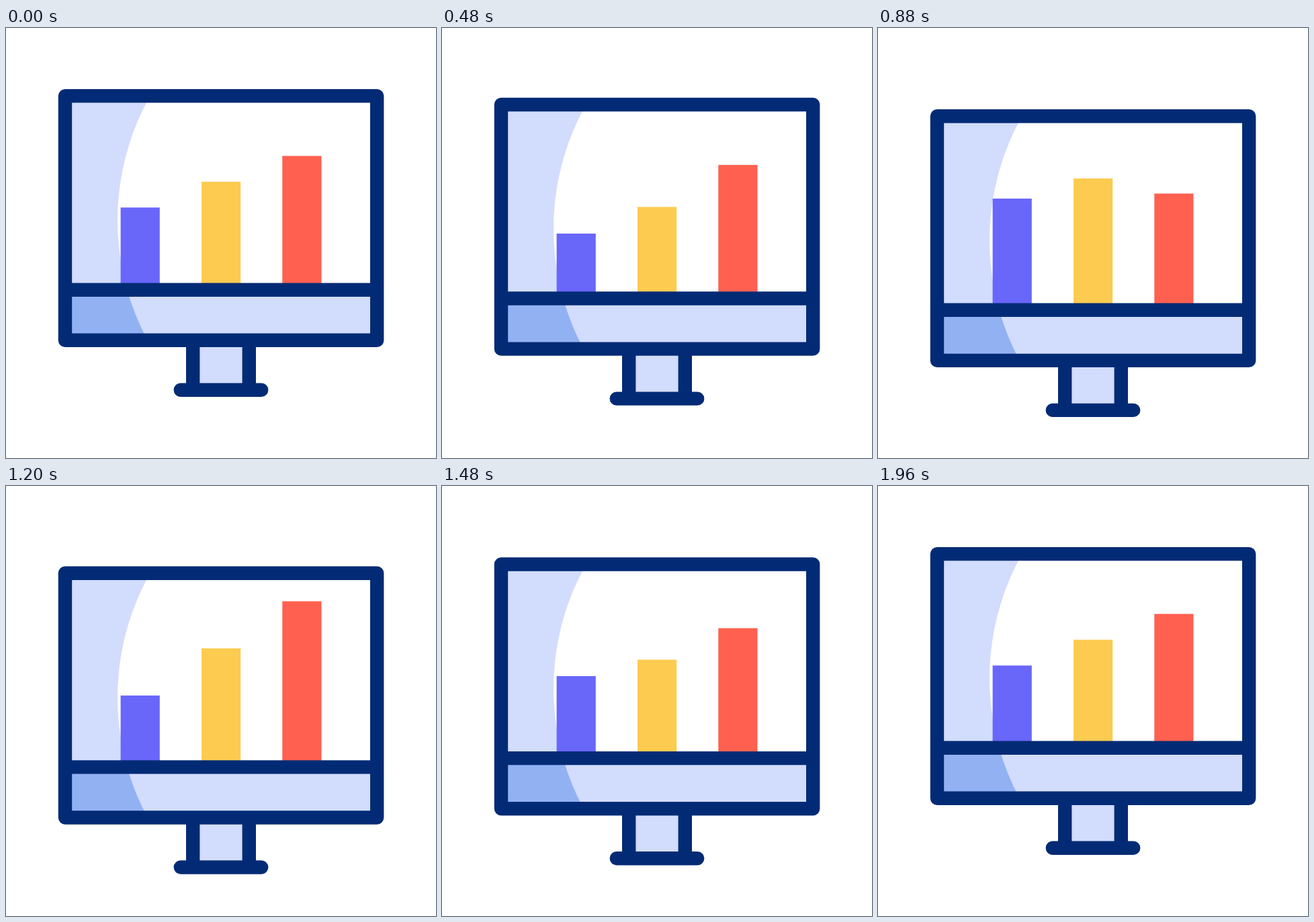
An HTML page for the animation above (2000 ms loop, 640x640 px).

```html
<!DOCTYPE html>
<html lang="en">
<head>
<meta charset="utf-8">
<title>Bar chart on a monitor</title>
<style>
  html, body { margin: 0; height: 100%; overflow: hidden; background: #fff; }
  svg { display: block; width: 100%; height: 100%; }
  .line { fill: none; stroke: #032b75; stroke-width: 20.4; stroke-linecap: round; stroke-linejoin: round; }
</style>
</head>
<body>
<svg viewBox="0 0 640 640">
  <clipPath id="case"><path d="M88 101H552V465H88Z"/></clipPath>
  <g id="monitor">
    <g clip-path="url(#case)">
      <path fill="#d2dcfd" d="M88 101H552V390H88Z"/>
      <circle cx="543.6" cy="286" r="377.6" fill="#fff"/>
    </g>
    <g id="bars">
      <rect x="170.6" width="58.2" fill="#6966fa"/>
      <rect x="291" width="58.2" fill="#fdcb50"/>
      <rect x="411.3" width="58.2" fill="#ff6050"/>
    </g>
    <path fill="#92b1f3" d="M88 390H552V465H88Z"/>
    <path fill="#d2dcfd" d="M180.3 390A377.6 377.6 0 0 0 210.8 465H552V390Z"/>
    <path fill="#d2dcfd" d="M278.2 465H361.8V539H278.2Z"/>
    <path class="line" d="M88 101.1H552.2V464.8H88ZM88 389.7H552.2M278.2 464.8H361.8V538.8H278.2ZM259.8 538.8H380.2"/>
  </g>
</svg>
<script>
const LOOP = 2000, STEP = 40, BASE = 390, DELAY = 200;
const restHeights = [122.8, 161.2, 199.6];
// Keys are [time in ms, value in px].
const drift = [[40, 0], [1000, 30.8], [1960, 0]];
const wave = [[40, 0], [400, -31], [800, 47.5], [1200, -16], [1520, 0]];

const monitor = document.getElementById('monitor');
const bars = [...document.getElementById('bars').children];

// Same curve as cubic-bezier(.5, 0, .5, 1), solved by bisection.
function ease(x) {
  let lo = 0, hi = 1;
  for (let i = 0; i < 24; i++) {
    const u = (lo + hi) / 2;
    if (1.5 * u * (1 - u) + u ** 3 < x) lo = u; else hi = u;
  }
  return lo * lo * (3 - 2 * lo);
}

function valueAt(keys, t) {
  if (t <= keys[0][0]) return keys[0][1];
  for (let i = 1; i < keys.length; i++) {
    const [t0, a] = keys[i - 1], [t1, b] = keys[i];
    if (t < t1) return a + (b - a) * ease((t - t0) / (t1 - t0));
  }
  return keys.at(-1)[1];
}

function draw(now) {
  const t = Math.floor(now % LOOP / STEP) * STEP;
  monitor.setAttribute('transform', `translate(0 ${valueAt(drift, t)})`);
  bars.forEach((bar, i) => {
    const height = restHeights[i] + valueAt(wave, t - i * DELAY);
    bar.setAttribute('y', BASE - height);
    bar.setAttribute('height', height);
  });
}

function tick() {
  draw(performance.now() - start);
  requestAnimationFrame(tick);
}
const start = performance.now();
tick();
</script>
</body>
</html>
```
